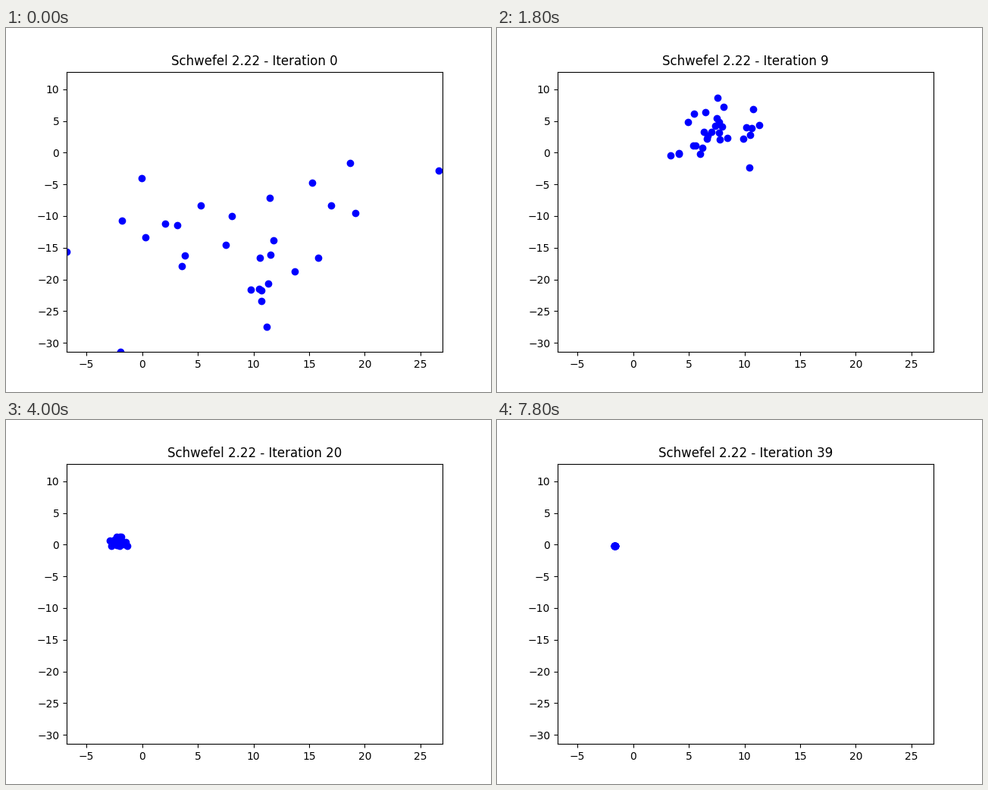
Write a matplotlib script that moves like this. It is 640 px wide and 480 px high and loops after 8 s.

```python
import matplotlib.pyplot as plt
import numpy as np
from matplotlib.animation import FuncAnimation

W, H, DPI = 640, 480, 100
COUNT = 30
XLIM = (-6.776, 26.975)
YLIM = (-31.432, 12.77)
LEFT, RIGHT, TOP, BOTTOM = 80, 576, 57.6, 427.2

rng = np.random.default_rng(7)

# Swarm path: iteration, centre x and y, spread x and y (stage pixels)
PATH = np.array([
    (0, 315, 285, 78, 60),
    (5, 381, 123.5, 43, 21),
    (9, 288.5, 138, 31, 21),
    (12, 237, 131, 31, 19),
    (20, 149.5, 161, 5.3, 3.4),
    (27, 152.7, 166, 0.8, 0.6),
    (39, 155.3, 166, 0.25, 0.2),
])
# Stragglers that touch the plot's edges at the start
EDGE = [(80, 295), (151, 427), (571, 188)]

times, centers, spreads = PATH[:, 0], PATH[:, 1:3], PATH[:, 3:]
slopes = np.gradient(centers, times, axis=0)
slopes[-2:] = 0


def cloud():
    """Random scatter with zero mean and unit spread."""
    pts = rng.normal(size=(COUNT, 2)).clip(-2.2, 2.2)
    return (pts - pts.mean(axis=0)) / pts.std(axis=0)


shapes = [cloud() for _ in times]
shapes[0][:len(EDGE)] = (EDGE - centers[0]) / spreads[0]


def swarm(i):
    """Pixel positions: smooth centre path, geometric spread, blended shape."""
    k = min(np.searchsorted(times, i, side="right") - 1, len(times) - 2)
    span = times[k + 1] - times[k]
    u = (i - times[k]) / span
    center = ((2 * u**3 - 3 * u**2 + 1) * centers[k]
              + (u**3 - 2 * u**2 + u) * span * slopes[k]
              + (3 * u**2 - 2 * u**3) * centers[k + 1]
              + (u**3 - u**2) * span * slopes[k + 1])
    spread = spreads[k] ** (1 - u) * spreads[k + 1] ** u
    a = u * np.pi / 2
    shape = np.cos(a) * shapes[k] + np.sin(a) * shapes[k + 1]
    return center + spread * shape


def to_data(p):
    x, y = p.T
    return np.column_stack([
        XLIM[0] + (x - LEFT) / (RIGHT - LEFT) * (XLIM[1] - XLIM[0]),
        YLIM[0] + (BOTTOM - y) / (BOTTOM - TOP) * (YLIM[1] - YLIM[0])])


fig = plt.figure(figsize=(W / DPI, H / DPI), dpi=DPI)
ax = fig.add_axes([LEFT / W, 1 - BOTTOM / H,
                   (RIGHT - LEFT) / W, (BOTTOM - TOP) / H])
dots = ax.scatter([], [], color="#0000ff")
ax.set(xlim=XLIM, ylim=YLIM)
title = ax.set_title("")


def update(i):
    dots.set_offsets(to_data(swarm(i)))
    title.set_text(f"Schwefel 2.22 - Iteration {i}")
    return dots, title


anim = FuncAnimation(fig, update, frames=40, interval=200,
                     repeat=True, repeat_delay=0, blit=False)
plt.show()
```
